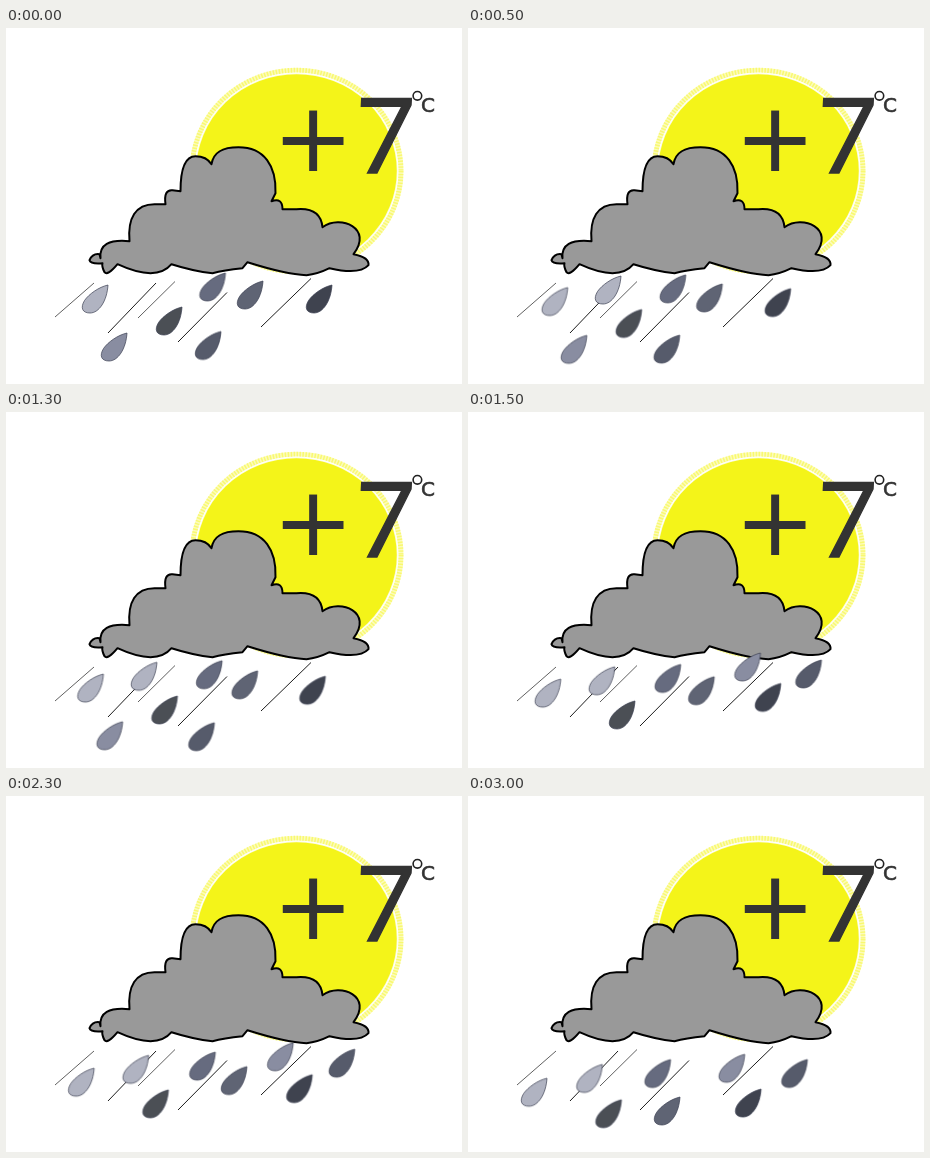
Write an HTML page that moves like this. It is 456 px wide and 356 px high and loops after 3500 ms.

```html
<!DOCTYPE html>
<html lang="en">
<head>
<meta charset="utf-8">
<title>Rainy weather</title>
<style>
  html, body { margin: 0; width: 100%; height: 100%; overflow: hidden; background: #fff; }
  svg { display: block; width: 456px; height: 356px; }
  text { font-family: "DejaVu Sans", Verdana, sans-serif; fill: #333; stroke: #333; stroke-width: 0; }
  .digit { font-family: "Open Sans", "Noto Sans", sans-serif; stroke-width: 1.4px; }
  .unit { stroke-width: .6px; }
</style>
</head>
<body>
<svg viewBox="0 0 456 356">
  <g transform="translate(290.5 143) scale(1 .965)" fill="none" stroke="#f4f419">
    <circle r="104.5" stroke-width="5" stroke-opacity=".3"/>
    <circle r="104.5" stroke-width="5" stroke-opacity=".45" stroke-dasharray="1.5 1.5"/>
    <circle r="101" fill="#f4f419" stroke="none"/>
    <circle r="101" stroke="#fff" stroke-width="1.5" stroke-opacity=".8"/>
  </g>

  <path transform="translate(.5 .2)" fill="#999" stroke="#000" stroke-width="2" stroke-linejoin="round" d="M83 232
    Q86 225 93 226L94 230Q92 210 123 213C121 190 129 176 148 176H159Q157 161 166 162L174 163
    C174 142 178 128 189 128Q200 128 205 136C207 123 217 119 232 119C258 119 270 138 269 165
    L265 173Q276 169 276 181H290Q314 179 316 199C334 186 367 200 347 226Q363 229 362 237
    Q353 247 323 240Q311 246 300 247Q279 246 241 234L236 240Q217 242 206 245Q187 243 165 236
    Q150 254 111 236Q101 248 98 244Q95 238 96 235Q84 236 83 232Z"/>

  <text x="266.4" y="143" font-size="97">+</text>
  <text class="digit" transform="translate(347 145.3) skewX(-3)" font-size="104.5">7</text>
  <circle cx="411.4" cy="67.8" r="4.3" fill="none" stroke="#222" stroke-width="1.6"/>
  <text class="unit" x="415" y="84" font-size="20">C</text>

  <g stroke="#1c1c1c">
    <path stroke-width=".7" d="M88 255L49 289M169 253.5L132 290"/>
    <path d="M150 255L102 305M221 264.5L172 314M305 250.5L255 299"/>
  </g>
  <g id="rain" stroke="#3c4052" stroke-width=".7"></g>
</svg>
<script>
const STEP = 500, COUNT = 7;
const SHAPE = 'M0 0C-9 2 -19 9 -23.5 15.5C-28 23 -25.5 28 -18 28C-9 28 -1 16 0 0Z';

// The first two steps are half as long as the others
const fallen = step => step - Math.min(step, 2) / 2;

// A drop appears at step `from` with its tip at x, y and slides down left until step `to`
const fall = (color, x, y, speed, from = 0, to = COUNT) => ({ color, x, y, speed, from, to });

const drops = [
  fall('#b0b3c1', 102, 257, 4.9),
  fall('#b0b3c1', 153, 248, 4.4, 1),
  fall('#666b7f', 219.5, 245, 3.6),
  fall('#5f6474', 257, 253, 5.7, 0, 6),
  fall('#5f6474', 212, 301, 5.7, 6),
  fall('#3f434f', 326, 257, 7),
  fall('#4b4f55', 176, 279, 4.8),
  fall('#898da1', 121, 305, 4.6, 0, 3),
  fall('#898da1', 292.5, 241, 5.6, 3),
  fall('#565b6b', 215, 303.5, 7, 0, 3),
  fall('#565b6b', 353.5, 248, 5, 3)
];

const rain = document.getElementById('rain');
for (const { color, x, y, speed, from, to } of drops) {
  const drop = document.createElementNS('http://www.w3.org/2000/svg', 'path');
  drop.setAttribute('d', SHAPE);
  drop.setAttribute('fill', color);
  rain.append(drop);

  const frames = Array.from({ length: COUNT + 1 }, (_, i) => {
    const step = Math.min(i, COUNT - 1);
    const way = speed * (fallen(step) - fallen(from));
    return {
      transform: `translate(${x - .94 * way}px, ${y + 1.03 * way}px)`,
      opacity: step >= from && step < to ? 1 : 0,
      offset: i / COUNT,
      easing: 'steps(1, end)'
    };
  });
  drop.animate(frames, { duration: STEP * COUNT, iterations: Infinity }).startTime = 0;
}
</script>
</body>
</html>
```
